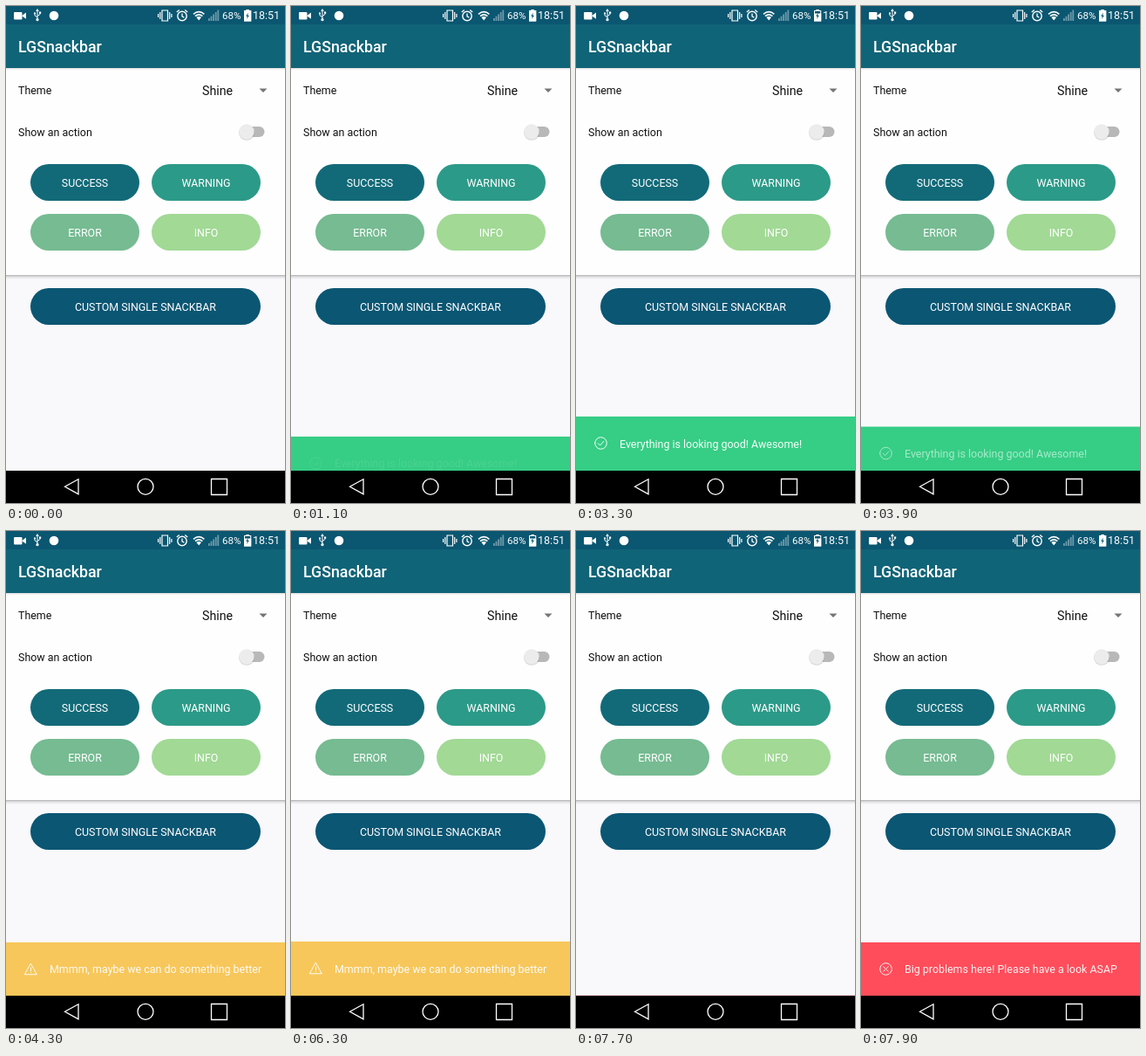
An HTML page for the animation above (8 s loop, 320x569 px).

```html
<!DOCTYPE html>
<html lang="en">
<head>
<meta charset="utf-8">
<title>Snackbar demo</title>
<style>
  html, body { margin: 0; width: 100%; height: 100%; overflow: hidden; background: #000; }
  svg { display: block; width: 320px; height: 569px; font: 12.44px Roboto, sans-serif; }
  .line { fill: none; stroke: #fff; }
</style>
</head>
<body>
<svg viewBox="0 0 320 569">
  <defs>
    <linearGradient id="shadow" x2="0" y2="1">
      <stop stop-color="#000" stop-opacity=".3"/>
      <stop offset=".4" stop-color="#000" stop-opacity=".1"/>
      <stop offset="1" stop-color="#000" stop-opacity="0"/>
    </linearGradient>
  </defs>

  <rect width="320" height="569" fill="#f9f8fa"/>
  <rect y="71" width="320" height="237" fill="#fefefe"/>
  <rect y="308" width="320" height="5" fill="url(#shadow)"/>
  <rect y="71" width="320" height="3" fill="url(#shadow)" opacity=".5"/>
  <rect width="320" height="71" fill="#106477"/>
  <rect width="320" height="21" fill="#0b5670"/>

  <!-- status bar -->
  <g fill="#fff">
    <rect x="9" y="7" width="9.5" height="8.5" rx="1"/>
    <path d="M18 11.2l5-3.6v7.2z"/>
    <g class="line" stroke-width="1">
      <path d="M36 5v10M36 13l-3-2.2V8.5M36 11.5l3-2V7.5"/>
      <path d="M179 5h6.5v12H179zM176.8 7v8M174.6 9v4M187.7 7v8M189.9 9v4" stroke-width="1.2"/>
      <circle cx="202" cy="11.5" r="5.2" stroke-width="1.4"/>
      <path d="M202 8.5v3.3l2.4 1.5M195.8 7l3-2.6M208.2 7l-3-2.6" stroke-width="1.3"/>
      <path d="M215 9.3q6.200-5.400 12.400 0M217 11.600q4.200-3.600 8.400 0" stroke-width="1.6"/>
    </g>
    <path d="M36 3l1.800 3h-3.600z"/>
    <circle cx="36" cy="15.700" r="1.600"/>
    <circle cx="33" cy="8.300" r="1.100"/>
    <path d="M38 6.500h2.200v2.200H38z"/>
    <circle cx="55" cy="11" r="5.300"/>
    <path d="M218.400 13q2.800-2 5.600 0l-2.800 3.500z"/>
    <path d="M232 14h1.800v3H232zM234.600 11.700h1.800V17h-1.800zM237.200 9.400h1.800V17h-1.800zM239.800 7h1.800v10h-1.800zM242.400 4.500h1.800V17h-1.800z" opacity=".4"/>
    <text x="248" y="15.300" font-size="11.600">68%</text>
    <path d="M275.300 4h3.600v1.500h-3.600z"/>
    <rect x="273.500" y="5.500" width="7.200" height="11.500" class="line"/>
    <rect id="charge" x="273" width="8.200"/>
    <path d="M277.800 7.500l-2.600 4.200h1.600l-.6 3.300 2.700-4.300h-1.700z" fill="#0b5670"/>
    <text x="283" y="15.400" font-size="12.500">18:51</text>
    <text x="14" y="53" font-size="17.780" font-weight="500">LGSnackbar</text>
  </g>

  <!-- settings -->
  <g fill="#111">
    <text x="14" y="101.300">Theme</text>
    <text x="14" y="148.700">Show an action</text>
    <text x="225" y="102" font-size="14.220">Shine</text>
  </g>
  <path d="M290.500 94.500h9l-4.500 4.500z" fill="#757575"/>
  <rect x="268" y="138" width="28.500" height="12" rx="6" fill="#b9b8b9"/>
  <circle cx="276" cy="144.800" r="9" fill="#000" opacity=".16"/>
  <circle cx="276" cy="144" r="8.700" fill="#ececec"/>

  <g id="buttons"></g>
  <g id="snack">
    <rect y="470" width="320" height="100"/>
    <g id="content">
      <path id="icon" class="line" stroke-width="1" stroke-linejoin="round" stroke-linecap="round"/>
      <text id="message" x="50" y="505.500" fill="#fff"></text>
    </g>
  </g>

  <!-- navigation bar -->
  <rect y="532" width="320" height="37"/>
  <g class="line" stroke-width="1.300">
    <path d="M67.500 550.300L83 541.800v17zM235.500 541.500h18v18h-18z"/>
    <circle cx="160" cy="550.300" r="9"/>
  </g>
</svg>

<script>
const $ = id => document.getElementById(id);
const LOOP = 8000, STEP = 100, SLIDE = 250, FADE = 180, FADE_DELAY = 70, HEIGHT = 62;

const buttons = [
  { label: 'SUCCESS', x: 28, y: 181, w: 125, color: '#126a78', press: 750 },
  { label: 'WARNING', x: 167, y: 181, w: 125, color: '#2c9a88', press: 3550 },
  { label: 'ERROR', x: 28, y: 238, w: 125, color: '#76bb92', press: 7350 },
  { label: 'INFO', x: 167, y: 238, w: 125, color: '#a1d995' },
  { label: 'CUSTOM SINGLE SNACKBAR', x: 28, y: 323, w: 264, color: '#0b5673' }
];

const ring = 'M21.700 500.500a6.800 6.800 0 1 0 13.600 0a6.800 6.800 0 1 0-13.600 0';
const snacks = [
  { from: 998, to: 3843, color: '#36cd85', text: 'Everything is looking good! Awesome!',
    icon: ring + 'M25.300 500.700l2.300 2.300 4.300-4.700' },
  { from: 4090, to: 7100, color: '#f7c75b', text: 'Mmmm, maybe we can do something better',
    icon: 'M28.500 494.500l6.800 12.300H21.700zM28.500 499v3.800M28.500 504.700v.1' },
  { from: 7690, to: Infinity, color: '#ff4d5b', text: 'Big problems here! Please have a look ASAP',
    icon: ring + 'M25.700 497.700l5.600 5.600M31.300 497.700l-5.600 5.600' }
];

const clamp = v => Math.min(1, Math.max(0, v));

// cubic-bezier(.4, 0, .2, 1)
function ease(x) {
  x = clamp(x);
  let lo = 0, hi = 1;
  for (let i = 0; i < 24; i++) {
    const s = (lo + hi) / 2, r = 1 - s;
    if (1.2 * r * r * s + 0.6 * r * s * s + s ** 3 < x) lo = s; else hi = s;
  }
  return lo * lo * (3 - 2 * lo);
}

$('buttons').innerHTML = buttons.map(b => `
  <rect x="${b.x}" y="${b.y}" width="${b.w}" height="42" rx="21" fill="${b.color}"/>
  <rect class="press" x="${b.x}" y="${b.y}" width="${b.w}" height="42" rx="21" opacity="0"/>
  <text x="${b.x + b.w / 2}" y="${b.y + 25.6}" text-anchor="middle" fill="#fff">${b.label}</text>`).join('');
const highlights = document.querySelectorAll('.press');

function draw(t) {
  buttons.forEach((b, i) => {
    const p = clamp((t - b.press) / 330) || 0;
    highlights[i].setAttribute('opacity', 0.1 * Math.sin(Math.PI * p));
  });

  const full = Math.floor((t + 200) / 500) % 2 === 0;
  $('charge').setAttribute('y', full ? 5 : 8.5);
  $('charge').setAttribute('height', full ? 12.5 : 9);

  const snack = snacks.find(s => t >= s.from && t < s.to + SLIDE);
  $('snack').style.display = snack ? '' : 'none';
  if (!snack) return;
  const leaving = t >= snack.to;
  const shown = leaving ? 1 - ease((t - snack.to) / SLIDE) : ease((t - snack.from) / SLIDE);
  const alpha = leaving ? 1 - ease((t - snack.to) / FADE) : ease((t - snack.from - FADE_DELAY) / FADE);
  $('snack').setAttribute('transform', `translate(0 ${HEIGHT * (1 - shown)})`);
  $('snack').setAttribute('fill', snack.color);
  $('content').setAttribute('opacity', 0.95 * alpha);
  $('icon').setAttribute('d', snack.icon);
  $('message').textContent = snack.text;
}

function tick() {
  draw(Math.floor(performance.now() % LOOP / STEP) * STEP);
  requestAnimationFrame(tick);
}
tick();
</script>
</body>
</html>
```
